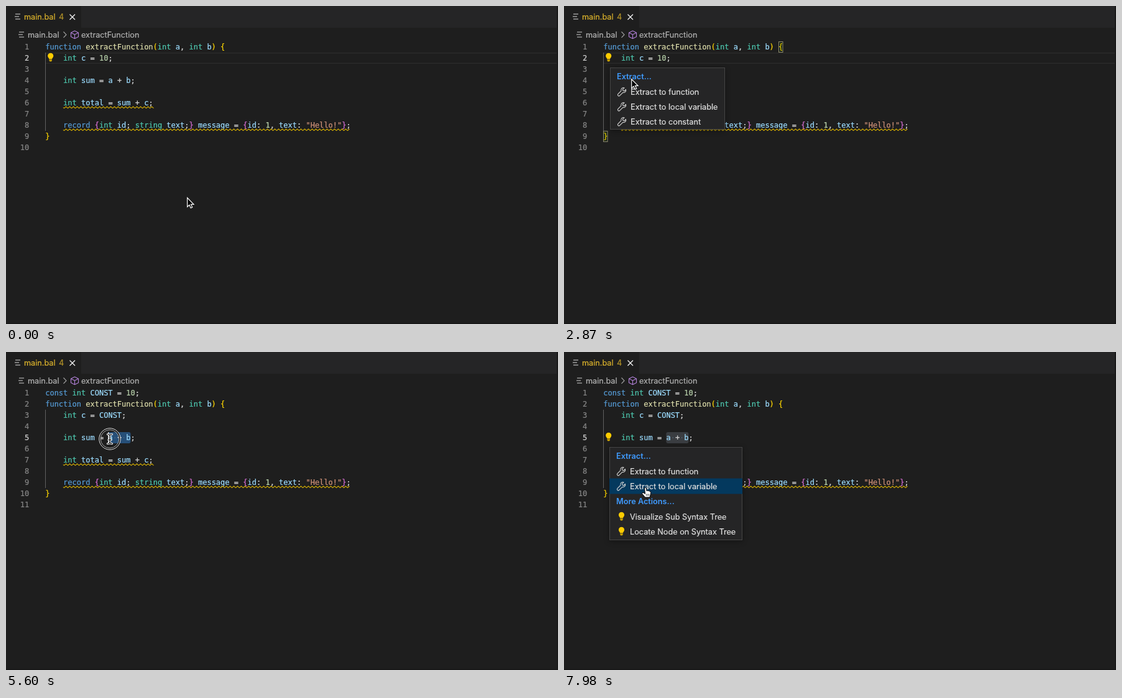
Write an HTML page that moves like this. It is 888 px wide and 512 px high and loops after 8 s.

```html
<!DOCTYPE html>
<html lang="en">
<head>
<meta charset="utf-8">
<title>Extract refactoring</title>
<style>
  html, body { margin: 0; width: 100%; height: 100%; overflow: hidden; background: #1e1e1e; }
  svg { display: block; width: 888px; height: 512px; }
  text { white-space: pre; font: 12.7px Inter, "Open Sans", sans-serif; }
  text, tspan { fill: currentColor; stroke: currentColor; stroke-width: .22; }
  .mono text { font: 12px "DejaVu Sans Mono", "Liberation Mono", monospace; }
  .num { color: #858585; text-anchor: end; }
  .num.on { color: #d0d0d0; }
  .head { color: #3f9bff; font-weight: 600; stroke: none; }
</style>
</head>
<body>
<svg id="stage" viewBox="0 0 888 512">
  <defs>
    <g id="bulb" transform="scale(.92)">
      <path d="M-2.4 2.6C-2.6 1.3-5-.2-5-3a5 5 0 0 1 10 0C5-.2 2.6 1.3 2.4 2.6z" fill="#fc0"/>
      <path d="M-2.4 3.2h4.8v2.3l-1 1.3h-2.8l-1-1.3z" fill="#e5b800"/>
      <path d="M-2.2 4.3h4.4" stroke="#3a3210" stroke-width=".7"/>
    </g>
    <path id="wrench" d="M13.5 3.4 10.9 6 9 5.2 8.4 3.3 11 .8A4 4 0 0 0 5.9 5.7L1 10.7a1.8 1.8 0 0 0 2.6 2.6L8.7 8.4A4 4 0 0 0 13.5 3.4z" fill="none" stroke="#d4d4d4" stroke-width="1.1" stroke-linejoin="round"/>
    <path id="lines" d="M1 1H9M0 5H7M1 9H9" fill="none" stroke-width="1.2"/>
  </defs>
  <rect width="888" height="512" fill="#1e1e1e"/>
  <rect width="888" height="35" fill="#252526"/>
  <rect width="121" height="35" fill="#1e1e1e"/>
  <use href="#lines" x="14" y="12" stroke="#dcdcdc"/>
  <text x="29" y="22" color="#d8b02c">main.bal</text>
  <text x="85" y="22" color="#b09028">4</text>
  <path d="M102.5 13.5l8.5 8.5m0-8.5l-8.5 8.5" stroke="#f4f4f4" stroke-width="1.3"/>
  <use href="#lines" x="20" y="41" stroke="#d0d0d0"/>
  <text x="35" y="51" color="#b0b0b0">main.bal</text>
  <path d="M92.5 41.5l4.5 4.7-4.5 4.7" fill="none" stroke="#a8a8a8" stroke-width="1.1"/>
  <path d="M104.5 43l6-3 6 3v6.5l-6 3-6-3zl6 3 6-3m-6 3v6.5" fill="none" stroke="#b180d7" stroke-width="1.1" stroke-linejoin="round"/>
  <text x="121" y="51" color="#b0b0b0">extractFunction</text>
</svg>
<script>
const LOOP = 8000, STEP = 70, X0 = 63.2, CW = 7.224, LH = 18;
const stage = document.getElementById('stage');
const colX = c => X0 + c * CW;
const topY = line => 57 + (line - 1) * LH;

function add(parent, tag, attrs = {}, text) {
  const el = document.createElementNS('http://www.w3.org/2000/svg', tag);
  for (const k in attrs) el.setAttribute(k, attrs[k]);
  if (text !== undefined) el.textContent = text;
  parent.appendChild(el);
  return el;
}
const group = (attrs, parent = stage) => add(parent, 'g', attrs);
const show = (el, on) => el.setAttribute('visibility', on ? 'inherit' : 'hidden');
const move = (el, x, y) => el.setAttribute('transform', `translate(${x.toFixed(2)} ${y.toFixed(2)})`);

// Code text
const BODY = [
  'function extractFunction(int a, int b) {',
  '    int c = 10;',
  '',
  '    int sum = a + b;',
  '',
  '    int total = sum + c;',
  '',
  '    record {int id; string text;} message = {id: 1, text: "Hello!"};',
  '}'
];
const EDITED = ['const int CONST = 10;', ...BODY];
EDITED[2] = '    int c = CONST;';

function tint(tok, line) {
  if (/^(function|record|const)$/.test(tok)) return '#569cd6';
  if (/^(int|string)$/.test(tok)) return '#4ec9b0';
  if (tok === 'extractFunction') return '#dcdcaa';
  if (tok[0] === '"') return '#ce9178';
  if (/^\d/.test(tok)) return '#b5cea8';
  if (/^\w/.test(tok)) return '#9cdcfe';
  if (/[{}]/.test(tok)) return /record/.test(line) ? '#da70d6' : '#ffd700';
  return /[()]/.test(tok) ? '#ffd700' : '#d4d4d4';
}

function squiggle(parent, line, x, end) {
  const y = topY(line) + 16.3;
  let d = `M${x} ${y}`;
  x -= 1.5;
  for (let low = true; x + 3 < end; low = !low) {
    x += 3;
    d += `L${x} ${y + (low ? 1.3 : -1.3)}`;
  }
  add(parent, 'path', { d, fill: 'none', stroke: '#d8b000', 'stroke-width': 1.1 });
}

function codeBlock(lines, plainFirst) {
  const g = group({ class: 'mono' });
  const open = lines.length - 8, close = lines.length;
  add(g, 'rect', { x: 63, y: topY(open + 1), width: 1, height: 7 * LH, fill: '#606060' });
  lines.forEach((line, i) => {
    const row = add(g, 'text', { x: X0, y: topY(i + 1) + 13 });
    for (const tok of line.match(/"[^"]*"|\w+|\s+|[^\w\s]/g) || [])
      add(row, 'tspan', { color: plainFirst && !i ? '#d4d4d4' : tint(tok, line) }, tok);
    if (/total|record/.test(line)) squiggle(g, i + 1, 92, colX(line.length) + 1);
  });
  const pair = group({ fill: 'rgba(0,100,0,.1)', stroke: '#8c886c' }, g);
  for (const [c, l] of [[39, open], [0, close]])
    add(pair, 'rect', { x: Math.round(colX(c)) + .5, y: topY(l) + .5, width: 6.5, height: 17 });
  return { g, pair };
}

const lineMark = group({ fill: '#2a2a2a' });
for (const y of [0, 16.5]) add(lineMark, 'rect', { x: 63, y, width: 823, height: 1.5 });

const selBox = add(stage, 'rect', { y: topY(5), height: LH, rx: 3 });
const dots = [15, 17].map(c =>
  add(stage, 'circle', { cx: colX(c + .5), cy: topY(5) + 9, r: .8, fill: '#5a7087' }));

const blocks = [codeBlock(BODY), codeBlock(EDITED, true), codeBlock(EDITED)];
const strays = group({});
for (const l of [6, 8]) squiggle(strays, l, 64, 71);

const gutter = group({ class: 'mono' });
const nums = Array.from({ length: 11 }, (_, i) =>
  add(gutter, 'text', { class: 'num', x: 37.2, y: topY(i + 1) + 13 }, i + 1));

const caret = add(stage, 'rect', { width: 1.6, height: LH, fill: '#d0d0d0' });
const bulb = group({});
add(bulb, 'use', { href: '#bulb' });

// Menus: an item with an icon is a row, otherwise a heading
function makeMenu(x, y, w, h, items) {
  const g = group({ transform: `translate(${x} ${y})` });
  add(g, 'rect', { x: .5, y: .5, width: w - 1, height: h - 1, fill: '#252526', stroke: '#454545',
    style: 'filter:drop-shadow(0 2px 4px rgba(0,0,0,.36))' });
  const mark = add(g, 'rect', { width: w, height: 25, fill: '#04395e' });
  const rows = [];
  let top = 2;
  for (const [label, icon] of items) {
    if (!icon) {
      add(g, 'text', { x: 11, y: top + 17, class: 'head' }, label);
      top += 25;
      continue;
    }
    const wrench = icon === 'wrench';
    add(g, 'use', { href: '#' + icon, x: wrench ? 12 : 19.5, y: top + (wrench ? 5 : 12) });
    add(g, 'text', { x: 33, y: top + 17, color: '#dedede' }, label);
    rows.push(top);
    top += 24;
  }
  return { g, x, y, w, h, rows, mark };
}
const constMenu = makeMenu(74, 99, 185, 100, [
  ['Extract...'], ['Extract to function', 'wrench'],
  ['Extract to local variable', 'wrench'], ['Extract to constant', 'wrench']
]);
const exprMenu = makeMenu(73, 153, 214, 150, [
  ['Extract...'], ['Extract to function', 'wrench'], ['Extract to local variable', 'wrench'],
  ['More Actions...'], ['Visualize Sub Syntax Tree', 'bulb'], ['Locate Node on Syntax Tree', 'bulb']
]);

add(stage, 'path', { d: 'M0 511H888M887 0V512', stroke: '#181818', 'stroke-width': 2 });

// Pointers
const ring = group({ fill: 'none' });
add(ring, 'circle', { r: 16, stroke: '#111', 'stroke-width': 2 });
add(ring, 'circle', { r: 17.2, stroke: '#e8e8e8', 'stroke-width': 1 });
add(ring, 'circle', { r: 14.8, stroke: '#bdbdbd', 'stroke-width': .9 });

const beam = 'M-3.5-7.5Q0-7.5 0-5Q0-7.5 3.5-7.5M0-5V5M-3.5 7.5Q0 7.5 0 5Q0 7.5 3.5 7.5M-2 1.5H2';
const pointers = { arrow: group({}), beam: group({ fill: 'none', 'stroke-linecap': 'round' }), hand: group({}) };
add(pointers.arrow, 'path', { d: 'M.7.8V15.3L4 12.2 6.2 17.3 8.7 16.2 6.5 11.3H11z',
  fill: '#000', stroke: '#fff', 'stroke-width': 1.2 });
add(pointers.beam, 'path', { d: beam, stroke: '#fff', 'stroke-width': 3.2 });
add(pointers.beam, 'path', { d: beam, stroke: '#000', 'stroke-width': 1.2 });
add(pointers.hand, 'path', {
  d: 'M-1.5 1.2Q0-.6 1.3 1.2L2 5.5Q3.5 4.2 4.5 5.7Q6 4.8 6.8 6.5Q8.8 6 8.7 8.5L8 12 7 16H-.5L-5 10.5Q-6 8.5-4 8.2L-.5 10.3z',
  fill: '#fff', stroke: '#000', 'stroke-width': 1, 'stroke-linejoin': 'round' });
add(pointers.hand, 'path', { d: 'M1.5 10.5v3M3.5 10.5v3M5.5 10.5v3', stroke: '#000', 'stroke-width': .7 });

// Pointer path: time, x, y
const PATH = [
  [0, 291, 308], [140, 229, 177], [280, 229, 177], [700, 164, 85], [1470, 164, 85],
  [1680, 112, 76], [1960, 74, 81], [2660, 74, 81], [2870, 108, 117], [3290, 132, 190],
  [4060, 132, 190], [4830, 201, 139], [5040, 201, 139], [5600, 167, 140], [6090, 167, 140],
  [6510, 80, 134], [6720, 74, 137], [7420, 74, 137], [7980, 131, 218]
];
function slope(i, k) {
  const a = PATH[i - 1], p = PATH[i], b = PATH[i + 1];
  if (!a || !b || a[k] === p[k] || b[k] === p[k]) return 0;
  return (b[k] - a[k]) / (b[0] - a[0]);
}
function pointerAt(t) {
  let i = 0;
  while (i < PATH.length - 2 && t >= PATH[i + 1][0]) i++;
  const a = PATH[i], b = PATH[i + 1], d = b[0] - a[0], u = Math.min(1, (t - a[0]) / d);
  const e = u * u * (3 - 2 * u);
  return [1, 2].map(k => a[k] + (b[k] - a[k]) * e
    + d * (u * (1 - u) ** 2 * slope(i, k) - u * u * (1 - u) * slope(i + 1, k)));
}

const within = (t, ...spans) => spans.some(([a, b]) => t >= a && t < b);

function render(now) {
  const t = Math.floor(now % LOOP / STEP) * STEP;
  const [x, y] = pointerAt(t);
  const line = t < 3780 ? 2 : t < 4970 ? 3 : 5;
  const from = t < 4970 ? 19 : t < 5600 ? Math.round((x - X0) / CW) : 14;
  const selected = from < 19;

  const version = t < 3780 ? 0 : t < 3850 ? 1 : 2;
  blocks.forEach((b, i) => {
    show(b.g, i === version);
    show(b.pair, i === version && t >= 840 && t < 5110);
  });
  nums.forEach((n, i) => n.setAttribute('class', i + 1 === line ? 'num on' : 'num'));
  show(nums[10], version > 0);
  show(lineMark, !selected);
  move(lineMark, 0, topY(line));
  show(strays, within(t, [4200, 5110]));

  show(selBox, selected);
  selBox.setAttribute('x', colX(from));
  selBox.setAttribute('width', colX(19) - colX(from));
  selBox.setAttribute('fill', t < 7000 ? '#264f78' : '#3a3d41');
  dots.forEach((d, i) => show(d, selected && from <= 15 + 2 * i));

  show(caret, within(t, [840, 1540], [2100, 2240], [3780, 4270], [4760, 6160], [6650, 7000]));
  caret.setAttribute('x', colX(line === 2 ? 14 : line === 3 ? 17 : from) - .3);
  caret.setAttribute('y', topY(line));

  const bulbLine = t < 3850 ? 2 : within(t, [4270, 4970]) ? 3 : t >= 5880 ? 5 : 0;
  show(bulb, bulbLine);
  if (bulbLine) move(bulb, 71.7, topY(bulbLine) + 8);

  const menu = within(t, [2240, 3780]) ? constMenu : t >= 7000 ? exprMenu : null;
  let kind = t < 70 ? 'arrow' : 'beam';
  if (bulbLine && x < 79 && Math.abs(y - topY(bulbLine) - 9) < 9) kind = 'hand';
  for (const m of [constMenu, exprMenu]) {
    show(m.g, m === menu);
    const inside = m === menu && x > m.x && x < m.x + m.w && y > m.y && y < m.y + m.h;
    const row = inside ? m.rows.find(r => y - m.y >= r && y - m.y < r + 24) : undefined;
    show(m.mark, false);
    if (inside) kind = 'arrow';
    if (row !== undefined) {
      kind = 'hand';
      show(m.mark, true);
      m.mark.setAttribute('y', row - .5);
    }
  }

  for (const k in pointers) {
    show(pointers[k], k === kind);
    move(pointers[k], x, y);
  }
  show(ring, within(t, [840, 1120], [4970, 5880], [6930, 7070]));
  move(ring, x, y);
}

function frame(now) {
  render(now);
  requestAnimationFrame(frame);
}
render(0);
requestAnimationFrame(frame);
</script>
</body>
</html>
```
